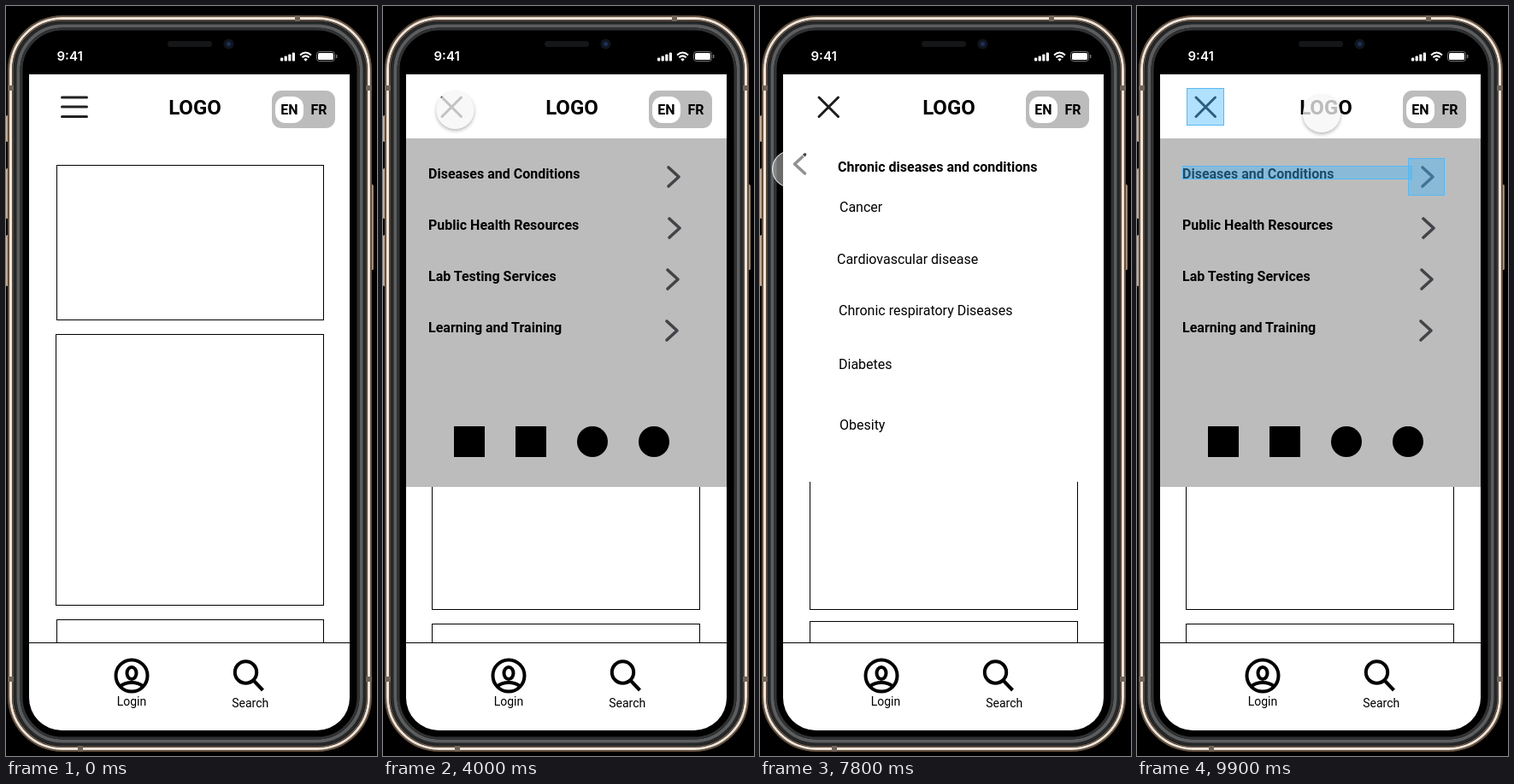
Animation of 434 by 878 pixels, one loop 10 s. Source, as an HTML page:

```html
<!DOCTYPE html>
<html lang="en">
<head>
<meta charset="utf-8">
<title>Mobile menu prototype</title>
<style>
  html, body { margin: 0; width: 100%; height: 100%; overflow: hidden; background: #000; }
  svg { position: absolute; left: 0; top: 0; }
  text { font: 16px Roboto, sans-serif; }
  .bold { font-weight: 700; }
  .label { font-size: 14px; text-anchor: middle; }
  .line { fill: none; stroke: #000; }
  .hot { fill: rgba(67,184,255,.42); stroke: #55b9f5; }
  #cursor {
    position: absolute; left: -22px; top: -22px; width: 44px; height: 44px;
    box-sizing: border-box; border-radius: 50%;
    background: rgba(246,246,246,.76); box-shadow: 0 2px 4px rgba(0,0,0,.3);
  }
  #cursor.pressed {
    background: rgba(255,255,255,.42); box-shadow: none;
    border: 1px solid rgba(255,255,255,.8);
  }
</style>
</head>
<body>
<svg id="stage" width="434" height="878" viewBox="0 0 434 878">
  <defs>
    <clipPath id="screen"><path d="M27 80H402V810A38 38 0 0 1 364 848H65A38 38 0 0 1 27 810Z"/></clipPath>
    <clipPath id="body"><rect x="27" y="155" width="375" height="590"/></clipPath>
    <linearGradient id="button"><stop stop-color="#d8bfa6"/><stop offset="1" stop-color="#8f7661"/></linearGradient>
  </defs>
  <rect width="434" height="878"/>
  <g id="phone"></g>
  <g clip-path="url(#screen)">
    <rect x="27" y="80" width="375" height="768" fill="#fff"/>
    <g id="burger" stroke="#222" stroke-width="3" stroke-linecap="round">
      <path d="M65.5 107H94.5M65.5 118H94.5M65.5 129.500H94.5"/>
    </g>
    <path id="close" d="M69 107L91.500 129.500M91.500 107L69 129.500" stroke="#1c1c1f" stroke-width="3" stroke-linecap="round"/>
    <text class="bold" x="221" y="127" text-anchor="middle" style="font-size:24px">LOGO</text>
    <rect x="311" y="99" width="74" height="44" rx="11" fill="#bcbcbc"/>
    <rect x="315" y="106" width="33" height="31" rx="12" fill="#fff"/>
    <text class="bold" x="331.500" y="127" text-anchor="middle">EN</text>
    <text class="bold" x="366" y="127" text-anchor="middle">FR</text>
    <g id="pages" clip-path="url(#body)"></g>
    <path class="line" d="M27 745.500H402"/>
    <g id="icons" class="line" stroke-width="4">
      <circle cx="147" cy="784" r="18.500"/>
      <ellipse cx="147" cy="781" rx="5.500" ry="7"/>
      <path d="M133.500 796.500Q139 792 147 792T160.500 796.500"/>
      <circle cx="280.500" cy="780" r="12.700"/>
      <path d="M290 790L300.500 801"/>
    </g>
    <text class="label" x="147" y="819">Login</text>
    <text class="label" x="285.700" y="821">Search</text>
  </g>
</svg>
<div id="cursor"></div>
<script>
const $ = id => document.getElementById(id);
const rect = (x, y, w, h, attrs) => `<rect x="${x}" y="${y}" width="${w}" height="${h}" ${attrs}/>`;
const text = (x, y, words, cls = '') => `<text x="${x}" y="${y}" class="${cls}">${words}</text>`;
const outline = (left, top, right, bottom) => rect(left, top, right - left, bottom - top, 'class="line"');
const chevron = (x, y, dir = 1) =>
  `<path d="M${x - 6 * dir} ${y - 11}L${x + 6 * dir} ${y}L${x - 6 * dir} ${y + 11}" fill="none" stroke="#434348" stroke-width="3.600" stroke-linecap="round" stroke-linejoin="round"/>`;
const panel = (bottom, color) => rect(27, 155, 375, bottom - 155, `fill="${color}"`);

// Phone shell: nested rounded outlines, side buttons, antenna gaps, status bar
const ring = (inset, color, width) =>
  rect(2 + inset, 11 + inset, 426 - 2 * inset, 862 - 2 * inset,
    `rx="${64 - inset}" fill="none" stroke="${color}" stroke-width="${width}"`);
const sideButton = (x, y, w, h) => rect(x, y, w, h, 'rx="1.500" fill="url(#button)"');
const gap = (x, y, w, h) => rect(x, y, w, h, 'fill="#70645a"');
$('phone').innerHTML =
  sideButton(0, 128, 3, 31) + sideButton(0, 190, 3, 59) + sideButton(0, 268, 3, 60) + sideButton(426, 209, 4, 100) +
  ring(1, '#65523f', 2) + ring(3.5, '#eee3d8', 3) + ring(6, '#6d5b4d', 1.5) +
  ring(9, '#252728', 4) + ring(12.5, '#5b5d5e', 4) + ring(16, '#303233', 3) +
  gap(338, 11, 6, 7) + gap(84, 866, 6, 7) +
  [93, 785].map(y => gap(2, y, 7, 6) + gap(421, y, 7, 6)).join('') +
  rect(189, 41, 52, 7, 'rx="3.500" fill="#151617"') +
  '<circle cx="260.500" cy="44.500" r="6" fill="#10151f"/><circle cx="260.500" cy="44.500" r="2.500" fill="#1d3156"/>' +
  '<text x="59.500" y="64" fill="#fff" style="font:600 15px Inter,sans-serif">9:41</text>' +
  [4, 6, 8, 10].map((h, i) => rect(321 + i * 4.6, 64.5 - h, 3.2, h, 'rx="1" fill="#fff"')).join('') +
  '<path d="M344 57.500Q350.500 51.500 357 57.500M346.400 60.300Q350.500 56.500 354.600 60.300" fill="none" stroke="#fff" stroke-width="2"/>' +
  '<path d="M348.300 62.300Q350.500 60.300 352.700 62.300L350.500 64.700Z" fill="#fff"/>' +
  rect(363.5, 53.5, 21, 11, 'rx="3" fill="none" stroke="#777"') +
  rect(365, 55, 18, 8, 'rx="1.500" fill="#fff"') + rect(386, 57, 1.4, 4, 'fill="#777"');

const pages = {
  home: outline(59.5, 186.5, 371.5, 367.5) + outline(58.5, 384.5, 371.5, 701.5) +
    outline(59.5, 718.5, 371.5, 900),
  menu: outline(57.5, 400, 370.5, 706.5) + outline(57.5, 723.5, 370.5, 900) + panel(563, '#bcbcbc') +
    ['Diseases and Conditions', 'Public Health Resources', 'Lab Testing Services', 'Learning and Training']
      .map((title, i) => text(53, 202 + i * 60, title, 'bold') + chevron([340, 341, 339, 338][i], 200 + i * 60)).join('') +
    [101, 173].map(x => rect(x - 18, 492, 36, 36, 'rx="0"')).join('') +
    [245, 317].map(x => `<circle cx="${x}" cy="510" r="18"/>`).join(''),
  diseases: outline(57.5, 400, 370.5, 706.5) + outline(57.5, 723.5, 370.5, 900) + panel(601, '#dbdbdb') +
    chevron(46.5, 185, -1) + text(92, 192, 'Diseases and Conditions', 'bold') +
    text(92, 242, 'Chronic diseases and') + text(92, 261, 'conditions') +
    text(92, 314, 'Healthcare associated') + text(92, 333, 'infections') +
    text(91, 403, 'Infectious diseases') + text(91, 478, 'Injuries') +
    text(91, 537, 'Mental illness and') + text(91, 556, 'substance use') +
    chevron(342, 241) + chevron(339, 319) + chevron(342, 393) + chevron(342, 475) + chevron(342, 543),
  chronic: outline(58.5, 400, 371.5, 706.5) + outline(58.5, 720.5, 371.5, 900) + panel(557, '#fff') +
    chevron(46.5, 185, -1) + text(91, 194, 'Chronic diseases and conditions', 'bold') +
    text(93, 241, 'Cancer') + text(90, 302, 'Cardiovascular disease') +
    text(92, 362, 'Chronic respiratory Diseases') + text(92, 425, 'Diabetes') + text(93, 496, 'Obesity'),
};
$('pages').innerHTML = Object.entries(pages).map(([name, art]) => `<g id="${name}">${art}</g>`).join('');
$('stage').insertAdjacentHTML('beforeend', `<g id="hints">${
  rect(58.5, 96.5, 43, 43, 'class="hot"') + rect(53.5, 187.5, 268, 15, 'class="hot"') +
  rect(317.5, 178.5, 42, 43, 'class="hot"')}</g>`);

const schedule = [
  [0, 'home'], [3600, 'menu'], [5300, 'diseases'], [6600, 'chronic'], [7900, 'diseases'], [9000, 'menu'],
];
const presses = [5200, 6500, 7800, 8900];
const iconShift = { diseases: -1, chronic: -5 };
// Cursor stops: time, x, y
const stops = [
  [1200, 242, -20], [2000, 96, 136], [2200, 96, 136], [3000, 84.5, 122], [4200, 84.5, 122],
  [5100, 341, 201], [5300, 341, 201], [6100, 340, 244], [6900, 340, 244], [7600, 36, 191],
  [8100, 36, 191], [8200, 41, 188], [9000, 41, 188], [9800, 216, 126], [10000, 216, 126],
];

function cursorAt(t) {
  const i = stops.findIndex(stop => stop[0] > t);
  const [t0, x0, y0] = stops[i - 1], [t1, x1, y1] = stops[i];
  const u = (t - t0) / (t1 - t0), ease = u * u * (3 - 2 * u);
  return [x0 + (x1 - x0) * ease, y0 + (y1 - y0) * ease];
}

const show = (id, visible) => { $(id).style.display = visible ? '' : 'none'; };

function draw(now) {
  const t = Math.floor(now % 10000 / 100) * 100;
  const page = schedule.filter(([start]) => start <= t).pop()[1];
  for (const name in pages) show(name, name === page);
  show('burger', page === 'home');
  show('close', page !== 'home');
  show('hints', t >= 9900);
  $('icons').setAttribute('transform', `translate(${iconShift[page] || 0} 0)`);
  show('cursor', t >= 1200);
  if (t >= 1200) {
    const [x, y] = cursorAt(t);
    $('cursor').style.transform = `translate(${x}px, ${y}px)`;
    $('cursor').className = presses.includes(t) ? 'pressed' : '';
  }
}

const start = performance.now();
function tick() {
  draw(performance.now() - start);
  requestAnimationFrame(tick);
}
tick();
</script>
</body>
</html>
```
